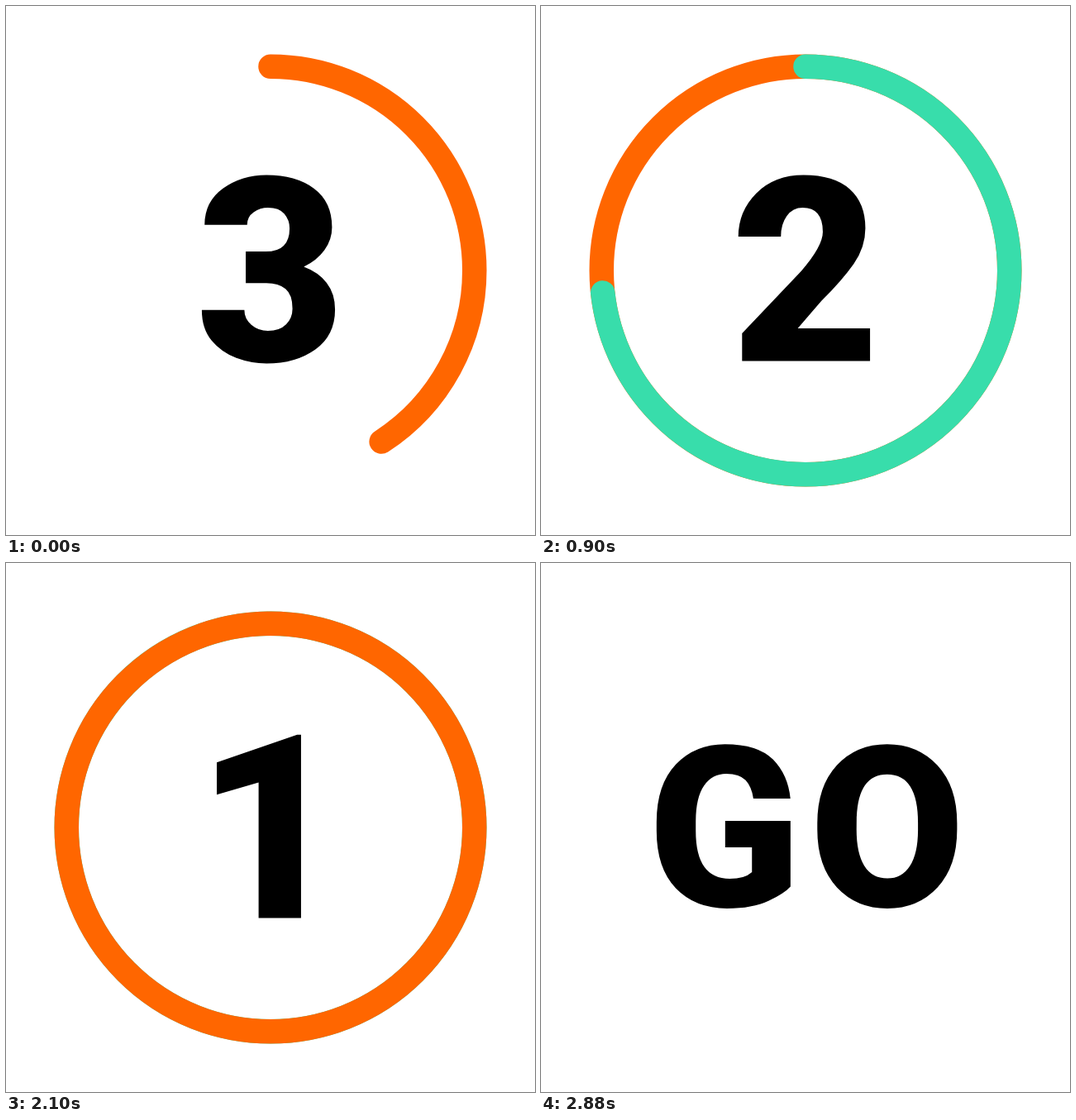
An HTML page with a canvas for the animation above (3.68 s loop, 640x640 px).

```html
<!DOCTYPE html>
<html lang="en">
<head>
<meta charset="utf-8">
<title>Countdown</title>
<style>
  html, body { margin: 0; width: 100%; height: 100%; overflow: hidden; background: #fff; }
  canvas { display: block; width: 640px; height: 640px; }
</style>
</head>
<body>
<canvas id="stage" width="640" height="640"></canvas>
<script>
const ctx = document.getElementById('stage').getContext('2d');
const ORANGE = '#ff6600', GREEN = '#38ddab';
const STEP = 60, STEPS_PER_DIGIT = 12, LOOP = 3680;
const SWEEP_STEPS = 16, SWEEP_LEAD = 4;
const CENTER = 320, RADIUS = 246.75, STROKE = 29.5;

const COUNTS = [
  { digit: '3', ring: ORANGE, under: null },
  { digit: '2', ring: GREEN, under: ORANGE },
  { digit: '1', ring: ORANGE, under: GREEN },
  { digit: '0', ring: GREEN, under: ORANGE },
];

// cubic-bezier(.25, .1, .25, 1)
function ease(x) {
  const curve = (a, b, s) => 3 * a * s * (1 - s) ** 2 + 3 * b * s * s * (1 - s) + s ** 3;
  let lo = 0, hi = 1;
  for (let i = 0; i < 30; i++) {
    const mid = (lo + hi) / 2;
    if (curve(0.25, 0.25, mid) < x) lo = mid; else hi = mid;
  }
  return curve(0.1, 1, lo);
}

function setFont(size) {
  ctx.font = `900 ${size}px Roboto, sans-serif`;
  ctx.fillStyle = '#000';
}

function drawRing(color, part) {
  const start = -Math.PI / 2;
  ctx.beginPath();
  ctx.arc(CENTER, CENTER, RADIUS, start, start + part * 2 * Math.PI);
  ctx.strokeStyle = color;
  ctx.lineWidth = STROKE;
  ctx.lineCap = 'round';
  ctx.stroke();
}

function drawCount(step) {
  const { digit, ring, under } = COUNTS[Math.floor(step / STEPS_PER_DIGIT)];
  const k = step % STEPS_PER_DIGIT;
  if (under) drawRing(under, 1);
  drawRing(ring, ease((k + SWEEP_LEAD) / SWEEP_STEPS));
  setFont(312);
  ctx.textAlign = 'center';
  ctx.fillText(digit, CENTER, 429.5);
}

// Centres the visible shape of a letter on x.
function drawLetter(letter, x) {
  const box = ctx.measureText(letter);
  ctx.fillText(letter, x + (box.actualBoundingBoxLeft - box.actualBoundingBoxRight) / 2, 415.3);
}

function drawGo() {
  setFont(272);
  ctx.textAlign = 'left';
  drawLetter('G', 220.3);
  drawLetter('O', 418.5);
}

const begin = performance.now();
let shown = -1;

function tick() {
  const time = (performance.now() - begin) % LOOP;
  const last = COUNTS.length * STEPS_PER_DIGIT;
  const step = Math.min(Math.floor(time / STEP), last);
  if (step !== shown) {
    shown = step;
    ctx.fillStyle = '#fff';
    ctx.fillRect(0, 0, 640, 640);
    if (step < last) drawCount(step); else drawGo();
  }
  requestAnimationFrame(tick);
}
tick();
</script>
</body>
</html>
```
